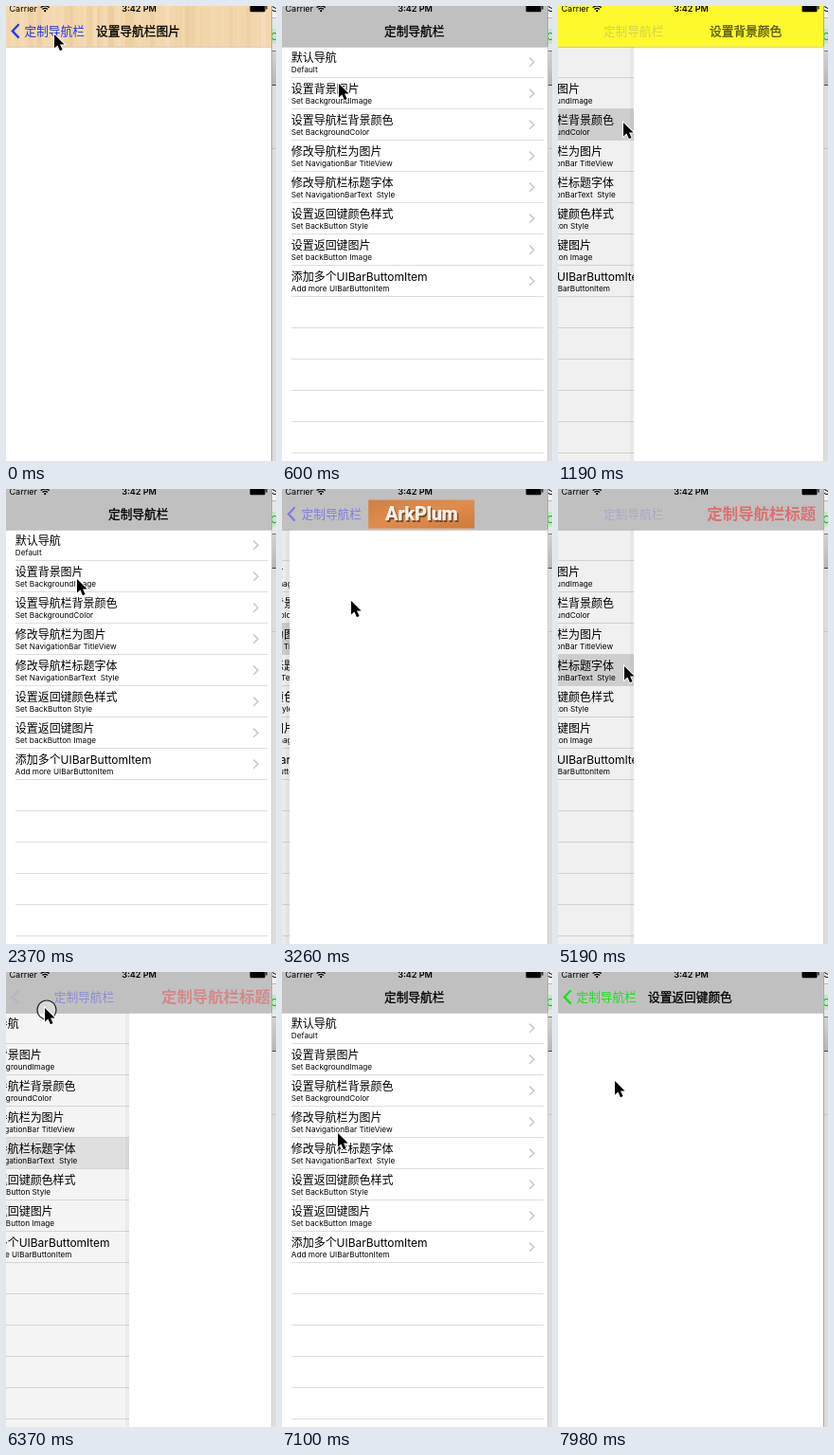
An HTML page that plays this animation: 285x480 px, repeating every 8000 ms.

```html
<!DOCTYPE html>
<html lang="zh-CN">
<head>
<meta charset="utf-8">
<title>定制导航栏</title>
<style>
html, body { margin: 0; width: 100%; height: 100%; overflow: hidden; background: #fff; }
svg { display: block; width: 285px; height: 480px; }
text { font-family: Inter, "Noto Sans CJK SC", "Noto Sans CJK", sans-serif; white-space: pre; }
.nav { font-size: 12.7px; }
.mid { stroke-width: .3; stroke: currentColor; }
.brand text { font-family: Roboto, sans-serif; }
</style>
</head>
<body>
<svg viewBox="0 0 285 480" xmlns="http://www.w3.org/2000/svg">
  <defs>
    <clipPath id="screen"><rect width="280.5" height="480"/></clipPath>
    <linearGradient id="steel" x2="0" y2="1"><stop offset="0" stop-color="#d2d2d2"/><stop offset="1" stop-color="#b6b6b6"/></linearGradient>
    <linearGradient id="clay" x2="1" y2="1"><stop offset="0" stop-color="#d07f45"/><stop offset=".5" stop-color="#e08c4c"/><stop offset="1" stop-color="#cf7a3c"/></linearGradient>
  </defs>

  <g id="side">
    <rect x="280" width="5" height="480" fill="#dcdcdc"/>
    <rect x="280" width="5" height="12" fill="#f4f4f4"/>
    <rect x="280" y="12" width="5" height="36" fill="#e6e6e6"/>
    <rect x="280" y="12" width="5" height="1" fill="#b8b8b8"/>
    <rect x="280" y="24" width="5" height="16" fill="#bfeabf"/>
    <rect x="280" y="47" width="5" height="1" fill="#777"/>
    <rect x="280" y="48" width="5" height="35" fill="url(#steel)"/>
    <rect x="280" y="83" width="5" height="1" fill="#444"/>
    <rect x="280" y="150" width="5" height="1" fill="#c4c4c4"/>
    <text x="280.5" y="6" font-size="10">S</text>
    <text x="279.5" y="36" font-size="10" fill="#1c9a2c">C</text>
    <rect x="280" width="1" height="480" fill="#a9a9a9"/>
  </g>

  <g clip-path="url(#screen)">
    <rect width="280" height="480" fill="#fff"/>
    <g id="list"></g>
    <rect id="dim" y="43" height="437"/>
    <rect id="edge" y="43" width="4" height="437"/>
    <rect id="page" y="43" width="280" height="437" fill="#fff"/>

    <rect id="bar" width="280" height="43"/>
    <g id="wood"></g>
    <rect y="43" width="280" height=".7" opacity=".27"/>

    <path id="chevron" d="M13.6 19.2 L6.8 26.4 L13.6 33.6" fill="none" stroke-width="2.3"/>
    <text id="label" class="nav" y="31">定制导航栏</text>
    <text id="home" class="nav mid" y="31">定制导航栏</text>
    <text id="title" y="31"></text>
    <g id="banner">
      <rect y="11.5" width="112" height="30" fill="url(#clay)"/>
      <g class="brand" font-size="20" font-weight="800" letter-spacing="-.4" text-anchor="middle">
        <text x="57.5" y="34.5" fill="#5a3216" opacity=".7">ArkPlum</text>
        <text x="56" y="33" fill="#f6f1ea">ArkPlum</text>
      </g>
    </g>

    <g id="status">
      <text x="3.5" y="6" font-size="9">Carrier</text>
      <g fill="none" stroke="#000" stroke-width="1.2">
        <path d="M36.6 1.6 Q41.2 -2 45.8 1.6"/>
        <path d="M38.4 3.5 Q41.2 1.3 44 3.5"/>
      </g>
      <circle cx="41.2" cy="5.2" r="1.1"/>
      <text x="140.5" y="6" font-size="9" font-weight="600" text-anchor="middle">3:42 PM</text>
      <rect x="257.5" y="-2" width="16" height="8.3" rx="1.2"/>
      <rect x="274.3" y="0" width="1.2" height="3.5"/>
    </g>
  </g>

  <g id="cursor">
    <circle id="ring" cx="2" cy="2" r="10" fill="#fff" fill-opacity=".4" stroke="#222" stroke-width="1.2"/>
    <path d="M0 0 V14.5 L3.4 11.4 L6 17.2 L8.6 16 L6 10.4 H10.6 Z" fill="#000" stroke="#fff" stroke-width="1.8" paint-order="stroke"/>
  </g>
</svg>

<script>
const LOOP = 8000, TICK = 147.9, W = 280, ROW = 33, TOP = 43;
const $ = id => document.getElementById(id);

const rows = [
  ['默认导航', 'Default'],
  ['设置背景图片', 'Set BackgroundImage'],
  ['设置导航栏背景颜色', 'Set BackgroundColor'],
  ['修改导航栏为图片', 'Set NavigationBar TitleView'],
  ['修改导航栏标题字体', 'Set NavigationBarText  Style'],
  ['设置返回键颜色样式', 'Set BackButton Style'],
  ['设置返回键图片', 'Set backButton Image'],
  ['添加多个UIBarButtomItem', 'Add more UIBarButtonItem']
];

const GRAY = '#c0c0c0', BLUE = '#2436f5', VIOLET = '#4a4cf0';
const pages = [
  { title: '设置导航栏图片', x: 95, bar: '#f2d6ac', tint: BLUE, wood: true },
  { title: '设置背景颜色', x: 102, bar: '#fdf92c', tint: BLUE },
  { banner: true, x: 89, bar: GRAY, tint: VIOLET },
  { title: '定制导航栏标题', x: 90, bar: GRAY, tint: VIOLET, color: '#ea4848', size: 16.4, travel: 210 },
  { title: '设置返回键颜色', x: 95, bar: GRAY, tint: '#14e614' }
];

// Ticks at which the screens change: pop, push, pop, push...
const moves = [2, 7, 14, 20, 27, 34, 43, 51];

// Pointer path: tick, x, y
const path = [
  [0, 51, 30], [3, 51, 30], [4, 60, 82], [5, 69, 123], [8, 69, 123], [9, 67, 112],
  [11, 53, 42], [12, 50, 32], [14, 50, 32], [15, 55, 45], [16, 75, 95], [17, 74, 140],
  [18, 73, 155], [21, 73, 155], [22, 73, 118], [24, 50, 44], [25, 46, 34], [27, 46, 34],
  [28, 56, 70], [29, 79, 142], [30, 75, 172], [32, 70, 187], [35, 70, 187], [36, 68, 165],
  [38, 50, 68], [40, 41, 38], [44, 41, 38], [46, 56, 120], [50, 62, 220], [52, 62, 220],
  [53, 61, 172], [54, 60, 115]
];

function add(parent, tag, attrs, text) {
  const el = document.createElementNS('http://www.w3.org/2000/svg', tag);
  set(el, attrs);
  if (text) el.textContent = text;
  return parent.appendChild(el);
}

function set(el, attrs) {
  for (const k in attrs) el.setAttribute(k, attrs[k]);
}

function build() {
  const list = $('list');
  add(list, 'rect', { id: 'pick', width: W, height: ROW, fill: '#dbdbdb' });
  for (let i = 0; i < 13; i++) {
    const y = TOP + i * ROW;
    add(list, 'rect', { x: 10, y: y + 32, width: 266, height: 1, fill: '#dedee0' });
    if (!rows[i]) continue;
    add(list, 'text', { x: 9.8, y: y + 16, 'font-size': 12, 'letter-spacing': '-.05' }, rows[i][0]);
    add(list, 'text', { x: 9.8, y: y + 27.2, 'font-size': 8.2 }, rows[i][1]);
    add(list, 'path', {
      d: `M261.3 ${y + 11.6} l4.6 4.6 l-4.6 4.6`,
      fill: 'none', stroke: '#c7c7cc', 'stroke-width': 1.5
    });
  }
  let seed = 7;
  const rnd = () => (seed = seed * 16807 % 2147483647) / 2147483647;
  for (let x = 0; x < W; x += 3 + rnd() * 9) {
    add($('wood'), 'rect', {
      x, width: 1 + rnd() * 5, height: TOP,
      fill: rnd() < .5 ? '#e2bd88' : '#fae4c2', opacity: .15 + rnd() * .25
    });
  }
}

const clamp = v => Math.max(0, Math.min(1, v));
const glide = k => Math.exp(-1.25 * Math.pow(k, 1.5));

function pointer(n) {
  let i = 1;
  while (i < path.length - 1 && path[i][0] < n) i++;
  const [a, ax, ay] = path[i - 1], [b, bx, by] = path[i];
  const u = clamp((n - a) / (b - a));
  return [ax + (bx - ax) * u, ay + (by - ay) * u];
}

function screen(n) {
  let i = moves.length - 1;
  while (i >= 0 && moves[i] > n) i--;
  const page = Math.floor((i + 1) / 2);
  if (i < 0) return { page, pop: false, k: 9, open: 0 };
  const pop = i % 2 === 0, k = n - moves[i];
  let open = pop ? 1 - glide(k + .63) : glide(k);
  if (open < .007) open = 0;
  if (open > .993) open = 1;
  return { page, pop, k, open };
}

function draw(t) {
  const n = Math.floor((t + 8) / TICK);
  const { page, pop, k, open } = screen(n);
  const p = pages[page];
  const x = Math.round(open * W), cover = 1 - open;
  const onList = open === 1;

  set($('list'), { transform: `translate(${-82 * cover})` });
  const pick = pop ? [.6, .15][k] || 0 : 1;
  set($('pick'), { y: TOP + (page + 1) * ROW, opacity: pick });
  set($('dim'), { width: x, opacity: .08 * cover });
  set($('edge'), { x: x - 4, opacity: onList || !open ? 0 : .035 });
  set($('page'), { x });

  const styled = !pop && !onList;
  set($('bar'), { fill: styled ? p.bar : GRAY });
  set($('wood'), { opacity: styled && p.wood ? 1 : 0 });

  // Titles run on their own curve, slightly off the page's
  const q = pop ? Math.pow(open, 1.36) : clamp(1.2 * open - .023);
  const labelX = 19.5 + 88.5 * q;
  const fadeIn = onList ? 0 : Math.pow(clamp(k / 3), 1.5);
  const fadeOut = [.45, .1][k] || 0;
  const chevron = pop ? (k ? 0 : .08) : k < 2 ? 0 : fadeIn;
  set($('chevron'), { stroke: p.tint, opacity: chevron });
  set($('label'), { x: labelX, fill: p.tint, opacity: pop ? fadeOut : fadeIn });
  set($('home'), { x: labelX, opacity: onList ? 1 : pop && k ? .7 : 0 });

  const titleX = p.x + (p.travel || 181) * q;
  const show = pop ? fadeOut : onList ? 0 : k === 1 ? .66 : 1;
  const title = $('title');
  title.textContent = p.title || '';
  set(title, {
    x: titleX, opacity: show, fill: p.color || '#000',
    class: p.color ? '' : 'mid',
    'font-size': p.size || 12.7,
    'font-weight': p.size ? 700 : 400,
    y: p.size ? 32 : 31
  });
  set($('banner'), { transform: `translate(${titleX})`, opacity: p.banner ? show : 0 });

  set($('cursor'), { transform: `translate(${pointer(n)})` });
  set($('ring'), { opacity: k === 0 ? 1 : 0 });
}

build();
const start = performance.now();
function loop() {
  draw((performance.now() - start) % LOOP);
  requestAnimationFrame(loop);
}
loop();
</script>
</body>
</html>
```
